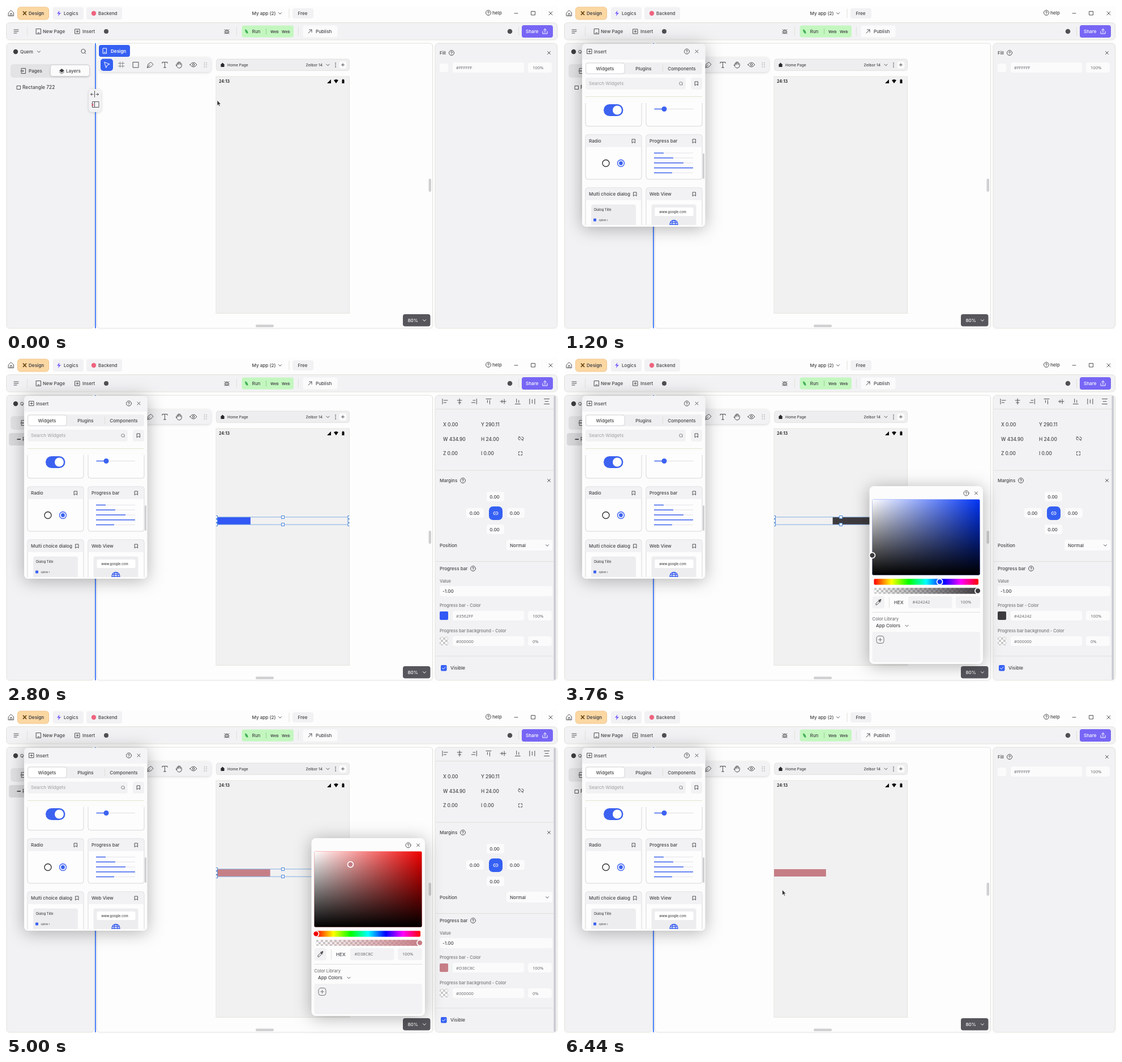
An HTML page that plays this animation: 975x574 px, repeating every 6480 ms.

```html
<!DOCTYPE html>
<html lang="en">
<head>
<meta charset="utf-8">
<title>App builder demo</title>
<style>
html, body { margin: 0; width: 100%; height: 100%; overflow: hidden; background: #fdfdfd; }
svg { display: block; }
text { font: 500 8.1px Inter, sans-serif; fill: #454549; white-space: pre; }
.b { font-weight: 600; }
.w { fill: #fff; }
.g { fill: #77777c; font-size: 7.5px; }
.n { font: 400 7.6px "Noto Sans", "Open Sans", sans-serif; fill: #6c6c70; }
.s { font-size: 6.7px; }
.l { font-size: 8.4px; }
.xs { font-size: 5.7px; }
.m { text-anchor: middle; }
.i { fill: none; stroke: #505054; stroke-width: 1; stroke-linecap: round; stroke-linejoin: round; }
.iw { stroke: #fff; }
.panel { fill: #f2f2f4; stroke: #e2e2dc; }
.f { fill: #fbfbfc; }
.p { fill: #f2f2f4; }
.rule { stroke: #dfdfdc; }
.sel { fill: #fff; stroke: #4b87d8; }
.pop { filter: drop-shadow(0 3px 15px rgba(0, 0, 0, .3)); }
.soft { filter: drop-shadow(0 1px 2px rgba(0, 0, 0, .16)); }
</style>
</head>
<body>
<svg width="975" height="574" viewBox="0 0 975 574">
<defs>
  <symbol id="help" viewBox="-6 -6 12 12" width="12" height="12"><g class="i"><circle r="4.5"/><path d="M-1.5-1Q-1.4-2.3 0-2.3T1.5-1Q1.4-.2 0 .5V.9M0 2.5V2.6"/></g></symbol>
  <symbol id="mark" viewBox="0 0 8 10" width="8" height="10"><path class="i" d="M1.5 1.5H6.5V8.2L4 6.2 1.5 8.2Z"/></symbol>
  <symbol id="close" viewBox="0 0 8 8" width="8" height="8"><path class="i" d="M1.5 1.5 6.5 6.5M6.5 1.5 1.5 6.5"/></symbol>
  <symbol id="down" viewBox="0 0 8 8" width="8" height="8"><path class="i" d="M1.5 2.7 4 5.3 6.5 2.7"/></symbol>
  <pattern id="check" width="8" height="8" patternUnits="userSpaceOnUse" x="548" y="407"><path fill="#fff" d="M0 0h8v8H0z"/><path fill="#c9c9c9" d="M0 0h4v4H0zM4 4h4v4H4z"/></pattern>
  <linearGradient id="white"><stop stop-color="#fff"/><stop offset="1" stop-color="#fff" stop-opacity="0"/></linearGradient>
  <linearGradient id="black" x2="0" y2="1"><stop stop-opacity="0"/><stop offset="1"/></linearGradient>
  <linearGradient id="hues"><stop stop-color="#f00"/><stop offset=".167" stop-color="#ff0"/><stop offset=".333" stop-color="#0f0"/><stop offset=".5" stop-color="#0ff"/><stop offset=".667" stop-color="#00f"/><stop offset=".833" stop-color="#f0f"/><stop offset="1" stop-color="#f00"/></linearGradient>
  <linearGradient id="fade"><stop class="tint" stop-opacity="0"/><stop class="tint" offset="1"/></linearGradient>
  <clipPath id="phone"><path d="M371 125h235.5v420H371z"/></clipPath>
  <clipPath id="list"><path d="M33 172h215v216H33z"/></clipPath>
</defs>

<!-- title bar -->
<path class="i" d="M4.5 12 9 7.5 13.5 12V17.5H4.5ZM7.5 17.5V13.5H10.5V17.5"/>
<rect x="20.5" y="2" width="55" height="22" rx="5" fill="#fbd7a2" stroke="#f0c78c"/>
<path d="M30 9.5 36 16M36 9.5 30 16" stroke="#6a4516" stroke-width="1.8"/>
<text x="40" y="16" class="b">Design</text>
<rect class="p" x="83" y="2" width="54" height="22" rx="4"/>
<path d="M94.5 8 90 13.5H93L92 18 97 12H93.7Z" fill="#7b61ff"/>
<text x="102" y="16">Logics</text>
<rect class="p" x="142" y="2" width="63" height="22" rx="4"/>
<circle cx="155" cy="13" r="4.2" fill="#ee6480"/>
<text x="163" y="16">Backend</text>
<text x="434.5" y="16">My app (2)</text><use href="#down" x="480" y="9"/>
<path class="rule" d="M500 5V21"/>
<rect class="p" x="506" y="4" width="37" height="18" rx="4"/><text x="515.5" y="16">Free</text>
<use href="#help" x="846" y="6"/><text x="859" y="14.5">help</text>
<path class="i" d="M898 13H904M928 9.5H934.5V16H928Z"/>
<path class="i" d="M959 10 965 16M965 10 959 16"/>

<!-- toolbar -->
<rect class="panel" x=".5" y="29.5" width="973" height="30.5" rx="6"/>
<path class="i" d="M14 42H22M14 45H22M14 48H19"/>
<path class="rule" d="M37.5 37V53M407.5 37V53M516.5 37V53M905.5 37V53"/>
<path class="i" d="M53.5 40.5H61.5V49.5H53.5ZM56 47.5H59"/><text x="65" y="48">New Page</text>
<path class="i" d="M122 41H130V49H122ZM126 43V47M124 45H128"/><text x="135" y="48">Insert</text>
<circle cx="177" cy="45" r="4" fill="#505054"/>
<g class="i"><ellipse cx="390" cy="45.5" rx="2.6" ry="3.5"/><path d="M386 42 388 43.5M394 42 392 43.5M385.500 46H387.5M392.500 46H394.5M386 49 388 48M394 49 392 48M390 43V48"/></g>
<rect x="416.5" y="34.5" width="91.5" height="21" rx="4" fill="#c3f7bf"/>
<path d="M422 41Q428 43 427.5 49Q422 48 422 41Z" fill="#43af58"/>
<text x="434.5" y="48">Run</text><path d="M459.5 40V50" stroke="#98d298"/>
<text x="467" y="47.5" class="b s">Web</text><text x="487" y="47.5" class="b s">Web</text>
<rect class="f" x="524.5" y="34.5" width="61" height="21" rx="4"/>
<path class="i" d="M534 48 540 42M535.5 42H540V46.5"/><text x="547" y="48">Publish</text>
<circle cx="890" cy="45" r="4.3" fill="#505054"/>
<rect x="911" y="34" width="55" height="22" rx="4" fill="#7766f5"/>
<text x="918" y="48" class="w">Share</text>
<path class="i iw" d="M948 45V49H956V45M952 47V40.5M949.5 43 952 40.5 954.5 43"/>

<!-- left panel -->
<rect class="panel" x="1" y="66" width="155" height="505" rx="6"/>
<circle cx="17" cy="81" r="4.2" fill="#3e3e42"/>
<text x="25" y="83.7">Quem</text><use href="#down" x="54" y="77"/>
<circle class="i" cx="136.5" cy="80" r="3.6"/><path class="i" d="M139.2 82.7 141 84.5"/>
<rect x="8" y="103" width="140" height="24" rx="5" fill="#e3e3e5"/>
<path class="i" d="M27.5 110.5H34.5V119.5H27.5ZM26 115H31M29.5 113.5 31 115 29.5 116.5"/><text x="40" y="118">Pages</text>
<rect class="f soft" x="79" y="105" width="68" height="19" rx="4"/>
<path d="M94 114.5 98.5 111 103 114.5 98.5 118Z" fill="#3e3e42"/><path class="i" d="M94.5 117 98.5 120 102.5 117"/><text x="106" y="118">Layers</text>
<g id="rectRow"><path class="i" d="M19.5 141.5H25.5V147.5H19.5Z"/><text x="29" y="147" class="l">Rectangle 722</text></g>
<g id="barRow"><rect x="5" y="133" width="147" height="22" rx="4" fill="#dadadd"/><path d="M19.5 144H26" stroke="#55555a" stroke-width="2"/><text x="29" y="147" class="l">Progress bar</text></g>

<!-- canvas -->
<rect x="160.5" y="66" width="593" height="505" rx="5" fill="#fdfdfd" stroke="#e0e0dc"/>
<rect x="157" y="66" width="2" height="505" fill="#4a80fa"/>
<rect class="p soft" x="146" y="147" width="22.5" height="41" rx="6"/>
<path class="i" d="M156.5 150.5V161.5M150 156.5H154M159 156.5H163.5M151.5 154.5 149.5 156.5 151.5 158.5M161.5 154.5 163.5 156.5 161.5 158.5"/>
<path class="i" d="M153 169.5H164V179.5H153ZM156.5 169.5V179.5"/><path d="M151 173 155 177M155 173 151 177" stroke="#dd4264"/>
<rect x="164" y="69" width="55" height="21" rx="4" fill="#3560f3"/>
<path class="i iw" d="M171.5 75H177.5V84H171.5ZM173.5 82H175.5"/><text x="185" y="83" class="w b">Design</text>
<rect class="p soft" x="165" y="91" width="197" height="26" rx="6"/>
<rect x="167" y="93.5" width="22" height="21.5" rx="5" fill="#3560f3"/>
<path class="i iw" d="M174 99.5 183 103 178.8 104.8 177 109Z"/>
<g class="i">
  <path d="M201.5 99V109M206 99V109M198.5 101.5H209M198.5 106.5H209" stroke="#8b8b90"/>
  <path d="M224.5 99.5H234V109H224.5Z"/>
  <path d="M249.5 109 251 103 256 99.5 260 103.5 256 107.5ZM250 108.5 254.5 104"/>
  <path d="M276 101.5V99.5H285V101.5M280.5 99.5V109M278.5 109H282.5"/>
  <path d="M302 105V101.5Q303 100 304 101.5V104M304 102V99.5Q305 98.5 306 99.5V103M306 100Q307.5 98.5 308.2 100V104M308.2 102Q309.7 101 310.2 102.5V106Q309.5 110 306 110Q303.5 110 302 107.5L300 104.5Q301 103.5 302 105"/>
  <path d="M325 104Q331 96 337 104Q331 112 325 104Z"/><circle cx="331" cy="104" r="1.8"/>
</g>
<path d="M350.5 100V109.5M354 100V109.5" stroke="#aaaaae" stroke-width="1.5" stroke-dasharray="1.5 2"/>
<rect x="371.5" y="94" width="235" height="20.5" rx="4" fill="#eeeef0" stroke="#e2e2df"/>
<path d="M378.5 104.5 382.5 100.5 386.5 104.5H385.5V108H379.5V104.5Z" fill="#29292c"/>
<text x="391" y="106.7" class="s">Home Page</text><text x="529.5" y="106.7" class="s">Zelbor 14</text><use href="#down" x="564.5" y="100.5"/>
<path d="M582 100.5V108.5" stroke="#414145" stroke-width="1.5" stroke-dasharray="1.5 1.7"/>
<rect class="f" x="588.5" y="98" width="13" height="13" rx="4"/><path class="i" d="M592.5 104.2H597.5M595 101.7V106.7"/>
<rect x="371" y="125" width="235.5" height="419.5" fill="#f1f1f2" stroke="#e5e5dd"/>
<text x="376" y="136.2" class="b" style="font-size:7.2px;fill:#151517">24:13</text>
<path d="M567 137 574 130V137ZM579 131.5Q583 128.5 587 131.5L583 137ZM593.5 130.5H594.7V129.5H596V130.5H597.5V137H593.5Z" fill="#09090a"/>
<g clip-path="url(#phone)">
  <rect id="bar1" class="tint" y="282" height="13"/><rect id="bar2" class="tint" y="282" height="13"/>
  <g id="selection">
    <path d="M371.5 281.8H606V295.2H371.5Z" fill="none" stroke="#82afe0"/>
    <g id="handles"></g>
  </g>
</g>
<rect x="746.5" y="306" width="4.5" height="23" rx="2" fill="#d0d0d2"/><rect x="441" y="564.5" width="32" height="4.5" rx="2" fill="#d0d0d2"/>
<rect x="701" y="546" width="48.5" height="21.5" rx="4" fill="#56565c"/>
<text x="709.5" y="560" class="w">80%</text><path class="i iw" d="M736.5 555.7 739 558.3 741.5 555.7"/>

<!-- right panel -->
<rect class="panel" x="758" y="66" width="215.5" height="505" rx="6"/>
<g id="fill">
  <text x="766" y="86">Fill</text><use href="#help" x="781" y="77"/><use href="#close" x="955" y="79"/>
  <rect class="f" x="766" y="102" width="15" height="15" rx="2"/><rect class="f" x="789" y="100" width="126" height="18" rx="4"/><rect class="f" x="922" y="100" width="42" height="18" rx="4"/>
  <text class="n" x="795" y="112">#FFFFFF</text><text class="n" x="930" y="112">100%</text>
</g>
<g id="props">
  <g id="aligns"></g>
  <path class="rule" d="M759 90.5H967M759 199H967M759 360.5H967M759 528H967"/>
  <text x="772" y="121" class="l">X 0.00</text><text x="839" y="121" class="l">Y 290.11</text>
  <text x="772" y="146.5" class="l">W 434.90</text><text x="839" y="146.5" class="l">H 24.00</text>
  <text x="772" y="172" class="l">Z 0.00</text><text x="839" y="172" class="l">I 0.00</text>
  <path class="i" d="M908 140H907Q905 140 905 142.5T907 145H908M911 140H912Q914 140 914 142.5T912 145H911M905.5 139 913.5 146.5"/>
  <path class="i" d="M905.5 168V166H907.5M909.5 166H911.5V168M911.5 170V172H909.5M907.5 172H905.5V170"/>
  <text x="766" y="220">Margins</text><use href="#help" x="801" y="211"/><use href="#close" x="955" y="213"/>
  <g class="f"><rect x="849" y="237" width="31" height="17" rx="4"/><rect x="849" y="295" width="31" height="17" rx="4"/><rect x="813" y="266" width="31" height="17" rx="4"/><rect x="885" y="266" width="31" height="17" rx="4"/><rect x="884" y="322" width="81" height="19" rx="4"/><rect x="766" y="404" width="199" height="18" rx="4"/></g>
  <text x="863" y="249" class="m">0.00</text><text x="863" y="306.5" class="m">0.00</text><text x="827.5" y="277.5" class="m">0.00</text><text x="898.5" y="277.5" class="m">0.00</text>
  <rect x="853" y="263" width="24" height="24" rx="7" fill="#3560f3"/>
  <path class="i iw" d="M864 272.5H863Q861 272.5 861 275T863 277.5H864M866 272.5H867Q869 272.5 869 275T867 277.5H866M863.5 275H866.5"/>
  <text x="766" y="334.5">Position</text><text x="890" y="334.5">Normal</text><use href="#down" x="952" y="328"/>
  <text x="766" y="376">Progress bar</text><use href="#help" x="819" y="367"/>
  <text x="766" y="398" class="g">Value</text><text x="771" y="416">-1.00</text>
  <text x="766" y="440.5" class="g">Progress bar - Color</text>
  <text x="766" y="485.5" class="g">Progress bar background - Color</text>
  <rect class="tint" x="766" y="449" width="15" height="15" rx="2"/>
  <rect x="766" y="494" width="15" height="15" rx="2" fill="url(#check)"/>
  <g class="f"><rect x="789" y="448" width="126" height="17" rx="4"/><rect x="922" y="448" width="42" height="17" rx="4"/><rect x="789" y="493" width="126" height="17" rx="4"/><rect x="922" y="493" width="42" height="17" rx="4"/></g>
  <text class="n hex" x="795" y="459.5"></text><text class="n" x="930" y="459.5">100%</text>
  <text class="n" x="795" y="504.5">#000000</text><text class="n" x="930" y="504.5">0%</text>
  <rect x="768" y="544" width="10.5" height="10.5" rx="2" fill="#3560f3"/><path class="i iw" d="M770.5 549.3 772.5 551.3 776 547.5"/>
  <text x="785" y="552">Visible</text>
  <rect x="967.5" y="67" width="3.5" height="503" rx="1.7" fill="#cacad2"/>
</g>

<!-- colour picker -->
<g id="picker">
  <rect class="pop" x="539.5" y="227" width="200.5" height="315" rx="8" fill="#fcfcfc"/>
  <use href="#help" x="704.5" y="233.5"/><use href="#close" x="724" y="235.5"/>
  <rect id="pure" x="544.5" y="250.5" width="190" height="134" rx="2"/>
  <rect x="544.5" y="250.5" width="190" height="134" rx="2" fill="url(#white)"/>
  <rect x="544.5" y="250.5" width="190" height="134" rx="2" fill="url(#black)"/>
  <rect x="547.5" y="391.3" width="184.5" height="10.5" rx="2" fill="url(#hues)"/>
  <rect x="547.5" y="407.3" width="186" height="10.5" rx="2" fill="url(#check)"/>
  <rect x="547.5" y="407.3" width="186" height="10.5" rx="2" fill="url(#fade)"/>
  <g stroke="#fff" stroke-width="1.7"><circle id="dot" class="tint" r="5"/><circle id="hueDot" cy="396.5" r="5"/><circle class="tint" cx="731" cy="412.5" r="5"/></g>
  <g class="p"><rect x="544.5" y="422" width="21.5" height="21.5" rx="4"/><rect x="608" y="422" width="77.5" height="21" rx="4"/><rect x="692" y="422" width="43" height="21" rx="4"/><rect x="544.5" y="485" width="190.5" height="54" rx="4"/></g>
  <path class="i" d="M551 437V435L556 430 558 432 553 437ZM555.5 428.5 559.5 432.5"/><path d="M557 430.5 559 428.5" stroke="#505054" stroke-width="3" stroke-linecap="round"/>
  <path class="rule" d="M574.5 424V442M544.5 450.5H735"/>
  <text x="583" y="435.5">HEX</text><text class="n hex" x="615.5" y="435"></text><text class="n" x="700" y="435">100%</text>
  <text x="544.5" y="465" class="g">Color Library</text><text x="551" y="477.2">App Colors</text><use href="#down" x="601.5" y="470.5"/>
  <g opacity=".8"><rect class="i" x="552" y="492.5" width="13" height="13" rx="4"/><path class="i" d="M555.7 499H561.3M558.5 496.2V501.8"/></g>
</g>

<!-- insert dialog -->
<g id="dialog">
  <rect class="pop" x="32" y="67" width="217.5" height="324" rx="7" fill="#fcfcfc"/>
  <path d="M32 95V74Q32 67 39 67H242.5Q249.5 67 249.5 74V95Z" fill="#f4f4f6"/>
  <path class="i" d="M41 76.5H49V84.5H41ZM45 78.5V82.5M43 80.5H47"/><text x="53" y="83.5">Insert</text>
  <use href="#help" x="211" y="74.5"/><use href="#close" x="230.5" y="76.5"/>
  <rect x="38" y="100" width="206" height="21" rx="4" fill="#efeff1"/><rect x="38.5" y="101" width="68.5" height="19" rx="4" fill="#fff" stroke="#d5d5d8"/>
  <text x="72.5" y="113.7" class="m">Widgets</text><text x="140.5" y="113.7" class="m">Plugins</text><text x="208" y="113.7" class="m">Components</text>
  <path class="rule" d="M174.5 104V117"/>
  <rect class="p" x="38" y="127" width="177" height="21" rx="4"/><text x="44" y="140" style="fill:#a9a9ad">Search Widgets</text>
  <g opacity=".7"><circle class="i" cx="206.5" cy="137.3" r="2.8"/><path class="i" d="M208.5 139.3 209.5 140.3"/></g>
  <rect class="p" x="224" y="127" width="20" height="21" rx="4"/><use href="#mark" x="230" y="132.5"/>
  <path d="M38 160.5H244" stroke="#e3e3d2"/>
  <g clip-path="url(#list)"><g id="cards">
    <g id="frames"></g>
    <rect x="70" y="174" width="34.5" height="21" rx="10.5" fill="#3c62f0"/><circle cx="94" cy="184.5" r="8" fill="#fff"/>
    <path d="M177 182.5H228" stroke="#e6e6ea" stroke-width="1.5"/><path d="M159.5 182.5H177" stroke="#3c62f0" stroke-width="1.5"/><circle cx="177" cy="182.5" r="4.5" fill="#3c62f0"/>
    <circle cx="74" cy="278.5" r="6" fill="none" stroke="#333337" stroke-width="1.4"/><circle cx="100.5" cy="278.5" r="6" fill="none" stroke="#3c62f0" stroke-width="1.4"/><circle cx="100.5" cy="278.5" r="3.4" fill="#3c62f0"/>
    <g id="lines"></g>
    <rect x="48" y="351.5" width="79" height="42" rx="4" fill="#ededef"/><text x="53" y="363" class="xs">Dialog Title</text>
    <rect x="52" y="376.5" width="5" height="5" rx="1" fill="#3c62f0"/><text x="61.5" y="380.7" style="font-size:4px">Option 1</text>
    <rect x="154.5" y="351.5" width="79" height="42" rx="4" fill="#ededef"/><rect x="160.5" y="357" width="68" height="15" rx="2" fill="#fff"/><text x="192" y="366.5" class="m xs">www.google.com</text>
    <g fill="none" stroke="#3c62f0" stroke-width="1.4"><circle cx="194" cy="386.5" r="7"/><ellipse cx="194" cy="386.5" rx="3" ry="7"/><path d="M188 383.5H200M187 387H201"/></g>
  </g></g>
  <rect id="thumb" x="245" width="3" height="45" rx="1.5" fill="#cfcfd2"/>
</g>
<path id="cursor" d="M0 0V9.5L2.2 7.5 3.7 10.7 5.2 10 3.7 6.9H6.5Z" fill="#333" stroke="#fff" stroke-width=".6"/>
</svg>
<script>
const LOOP = 6480, BLUE = '#3c62f0';
const $ = id => document.getElementById(id);
const set = (el, attrs) => { for (const k in attrs) el.setAttribute(k, attrs[k]); };
const show = (id, on) => { $(id).style.display = on ? '' : 'none'; };

const names = ['Text', 'Button', 'Image', 'Icon', 'Text field', 'Checkbox', 'Dropdown', 'Video',
  'Switch', 'Slider', 'Radio', 'Progress bar', 'Multi choice dialog', 'Web View'];
$('frames').innerHTML = names.map((name, i) => {
  const row = i >> 1, x = i % 2 ? 145 : 38, y = 228 + (row - 5) * 94;
  return `<rect x="${x}" y="${y}" width="99" height="79" rx="4" fill="#fdfdfd" stroke="#d7d7da"/>
    <path d="M${x + .5} ${y + 22}v-18q0-3.5 3.5-3.5h91q3.5 0 3.5 3.5v18z" fill="#f2f2f4"/>
    <text x="${x + 6}" y="${y + 14}">${name}</text>
    <use href="#mark" x="${x + (name.length > 14 ? 83.5 : 81)}" y="${y + 6.5}"/>` +
    (row < 4 ? `<rect x="${x + 32}" y="${y + 43}" width="35" height="14" rx="3" fill="${BLUE}"/>` : '');
}).join('');
$('lines').innerHTML = [17, 34, 52, 69, 32].map((w, i) => {
  const y = 260.5 + i * 8.75;
  return `<path d="M159 ${y}h69" stroke="#ebebef" stroke-width="1.3"/><path d="M159 ${y}h${w}" stroke="${BLUE}" stroke-width="1.5"/>`;
}).join('');

// side handles are cut off by the phone's edges
const handle = (x, y) => `<rect class="sel" x="${x - 2.5}" y="${y - 2.5}" width="5" height="5"/>`;
$('handles').innerHTML = [371, 489, 606.5].map(x =>
  handle(x, 282) + handle(x, 295) + (x === 489 ? '' : handle(x, 288.5))).join('');

const edge = 'M-4.5-4.5V4.5M-2-2H4.5M-2 2H2';
const middle = 'M0-5V5M-4-2H4M-2.5 2H2.5';
const spread = 'M-4.5-4.5V4.5M4.5-4.5V4.5M0-3V3';
$('aligns').innerHTML = [[edge, 0], [middle, 0], [edge, 180], [edge, 90], [middle, 90], [edge, -90], [spread, 0], [spread, 90]]
  .map(([d, turn], i) => `<path class="i" transform="translate(${775.5 + i * 25.65} 77) rotate(${turn})" d="${d}"/>`).join('');

const clamp = x => Math.min(1, Math.max(0, x));
const part = (t, a, b) => clamp((t - a) / (b - a));
const ease = x => x * x * (3 - 2 * x);
const mix = (a, b, p) => a + (b - a) * p;

// cubic-bezier(x1, 0, x2, 1) solved by bisection
function bezier(x, x1, x2) {
  if (x <= 0 || x >= 1) return clamp(x);
  let lo = 0, hi = 1;
  for (let i = 0; i < 24; i++) {
    const u = (lo + hi) / 2, v = 1 - u;
    if (3 * x1 * u * v * v + 3 * x2 * u * u * v + u ** 3 < x) lo = u; else hi = u;
  }
  return ease(lo);
}

function placeBar(id, tail, head) {
  set($(id), { x: 371 + 235.5 * tail, width: 235.5 * Math.max(0, head - tail) });
}

function hsv(h, s, v) {
  return [5, 3, 1].map(n => {
    const k = (n + h / 60) % 6;
    return Math.round(255 * v * (1 - s * Math.max(0, Math.min(k, 4 - k, 1))));
  });
}
const hex = rgb => '#' + rgb.map(c => c.toString(16).padStart(2, '0')).join('').toUpperCase();
// the screen shows colours slightly muted against their hex values
const muted = ([r, g, b]) => `rgb(${r * .94} ${g * .9} ${b * .96})`;

function draw(t) {
  const added = t >= 2600, selected = added && t < 6300;
  show('dialog', t >= 560);
  show('rectRow', !selected);
  show('barRow', selected);
  show('fill', !selected);
  show('props', selected);
  show('selection', selected);
  show('picker', t >= 3040 && t < 5800);
  show('bar1', added);
  show('bar2', added);

  const scroll = 427 * ease(part(t, 700, 1080));
  set($('cards'), { transform: `translate(0 ${427 - scroll})` });
  set($('thumb'), { y: 172 + scroll * 89 / 427 });

  // indeterminate progress: two segments per 1800 ms cycle, sped up
  const c = Math.max(0, 226 + (t - 2800) * 1.245) % 1800;
  placeBar('bar1', bezier(part(c, 333, 1083), .4, 1), bezier(part(c, 0, 750), .2, .8));
  placeBar('bar2', bezier(part(c, 1267, 1800), .1, .45), bezier(part(c, 1000, 1567), 0, .65));

  const dark = ease(part(t, 3220, 3680)), pink = ease(part(t, 4600, 4940));
  const h = mix(226.6, 0, ease(part(t, 4120, 4500)));
  const s = mix(mix(.792, 0, dark), .3365, pink);
  const v = mix(mix(1, .26, dark), .8275, pink);
  const rgb = hsv(h, s, v), color = muted(rgb), pure = muted(hsv(h, 1, 1));
  document.querySelectorAll('.tint').forEach(el => { el.style.fill = el.style.stopColor = color; });
  document.querySelectorAll('.hex').forEach(el => { el.textContent = hex(rgb); });
  set($('pure'), { fill: pure });
  set($('dot'), { cx: 544.5 + 190 * s, cy: 250.5 + 134 * (1 - v) });
  set($('hueDot'), { cx: 547.5 + 184.5 * h / 360, fill: pure });

  const late = t >= 5800, p = ease(late ? part(t, 5840, 6220) : part(t, 60, 500));
  const [x, y] = late ? [mix(728, 385.5, p), mix(240, 318.5, p)] : [mix(373, 143, p), mix(167, 45, p)];
  show('cursor', late || t < 640);
  set($('cursor'), { transform: `translate(${x} ${y})` });
}

const start = performance.now();
function tick() {
  draw((performance.now() - start) % LOOP);
  requestAnimationFrame(tick);
}
tick();
</script>
</body>
</html>
```
